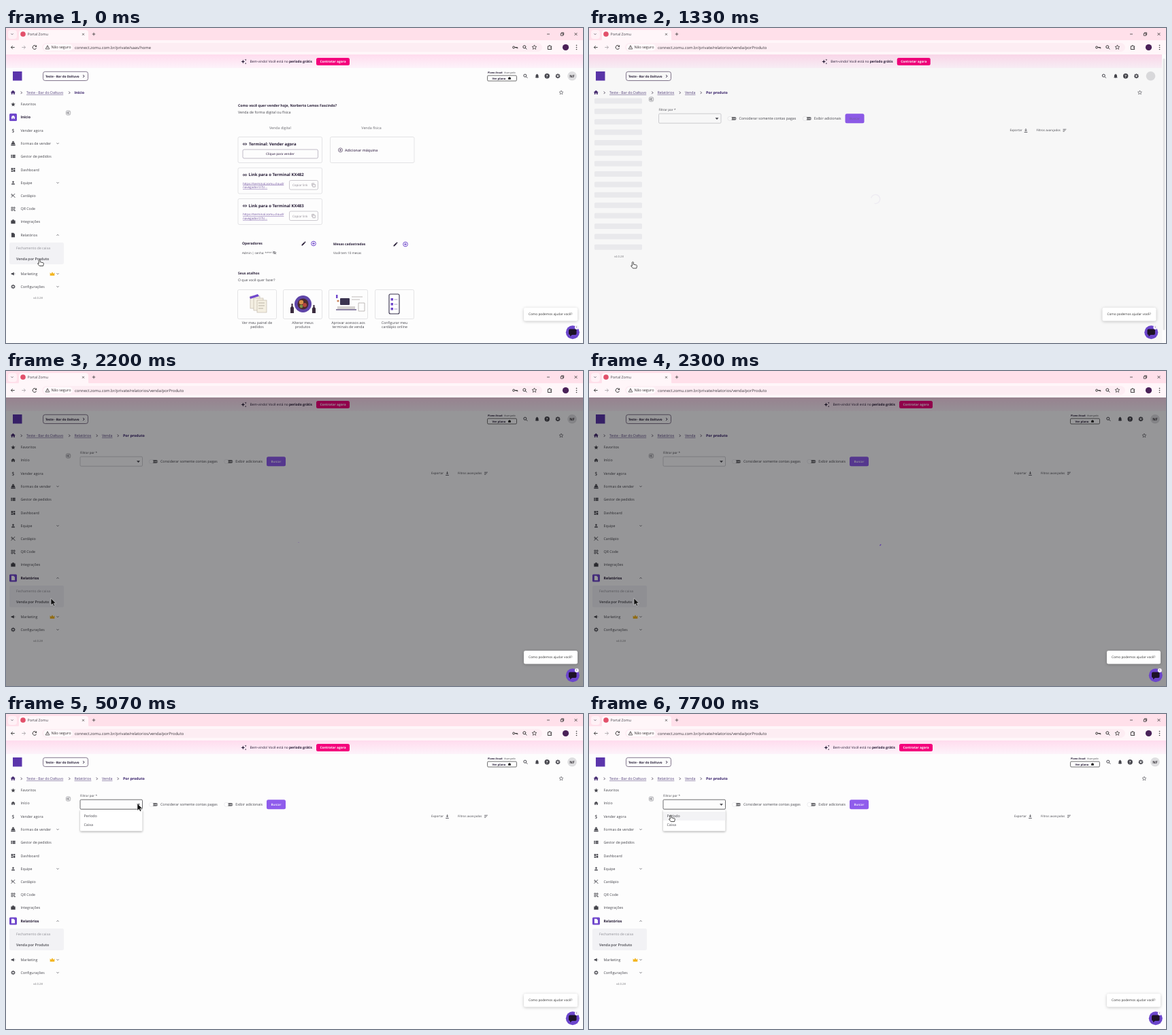
Animation, 848 px wide and 464 px high, one loop 8000 ms. Source, as an HTML page:

```html
<!DOCTYPE html>
<html lang="pt-BR">
<head>
<meta charset="utf-8">
<title>Portal Zomu</title>
<style>
html, body { margin: 0; width: 100%; height: 100%; overflow: hidden; background: #fdfdfd; }
svg { display: block; width: 100vw; height: 100vh; font-family: "Open Sans", "Noto Sans", sans-serif; text-rendering: geometricPrecision; }
</style>
</head>
<body>
<svg id="stage" viewBox="0 0 848 464"></svg>
<script>
const LOOP = 8000, BG = '#fdfdfd', INK = '#45454c', DARK = '#261c36', PURPLE = '#7048cc', LINE = '#d8d8dc';
const stage = document.getElementById('stage');

function el(parent, tag, attrs = {}) {
  const node = document.createElementNS('http://www.w3.org/2000/svg', tag);
  for (const k in attrs) node.setAttribute(k, attrs[k]);
  parent.appendChild(node);
  return node;
}
const group = (parent, attrs) => el(parent, 'g', attrs);
const rect = (p, x, y, width, height, fill, more = {}) => el(p, 'rect', { x, y, width, height, fill, ...more });
const disc = (p, cx, cy, r, fill, more = {}) => el(p, 'circle', { cx, cy, r, fill, ...more });
const path = (p, d, fill, more = {}) => el(p, 'path', { d, fill, ...more });
const stroked = (p, d, stroke, width = 0.8) => path(p, d, 'none', { stroke, 'stroke-width': width });
const box = (p, x, y, w, h, stroke = LINE, fill = 'none', rx = 2) => rect(p, x, y, w, h, fill, { rx, stroke, 'stroke-width': 0.7 });

// y is the middle of the line
function text(p, x, y, str, size = 5.3, fill = INK, more = {}) {
  const node = el(p, 'text', { x, y: y + size * 0.36, 'font-size': size, fill, ...more });
  node.textContent = str;
  return node;
}
const BOLD = { 'font-weight': 700 }, SEMI = { 'font-weight': 600 }, MID = { 'text-anchor': 'middle' };
const LINK = { 'text-decoration': 'underline' };

// Icons live on a 24 unit grid
const ICON = {
  star: 'M12 17.3l6.2 3.7-1.6-7L22 9.2l-7.2-.6L12 2 9.2 8.6 2 9.2l5.5 4.8-1.7 7z',
  home: 'M10 20v-6h4v6h5v-8h3L12 3 2 12h3v8z',
  till: 'M8 2h8v5H8zM6 8h12l4 9H2zM2 18h20v4H2z',
  list: 'M2 5h5v4H2zM9 5h13v4H9zM2 10h5v4H2zM9 10h13v4H9zM2 15h5v4H2zM9 15h13v4H9z',
  board: 'M3 13h8V3H3zm0 8h8v-6H3zm10 0h8V11h-8zm0-18v6h8V3z',
  person: 'M12 12a4 4 0 100-8 4 4 0 000 8zm-8 8h16v-2c0-3-5-4-8-4s-8 1-8 4z',
  fork: 'M4 3l17 18M20 3L3 20M3 8l6 4',
  squares: 'M4 4h6v6H4zM14 4h6v6h-6zM4 14h6v6H4zM14 14h3v3h-3zM18 18h3v3h-3z',
  bag: 'M2 6h20v15H2zM8 2h8v4H8z',
  doc: 'M4 2h10l6 6v14H4z',
  horn: 'M3 10v5h4l9 5V5L7 10zM18 11h4v2h-4z',
  gear: 'M12 6.5a5.5 5.5 0 110 11 5.5 5.5 0 010-11M12 2v4M12 18v4M2 12h4M18 12h4M5 5l3 3M16 16l3 3M19 5l-3 3M8 16l-3 3',
  bell: 'M10 20h4l-2 2zm8-4v-5c0-3-1.6-5.6-4.5-6.3V3h-3v1.7C7.6 5.4 6 8 6 11v5l-2 2v1h16v-1z',
  search: 'M10 4a6 6 0 110 12 6 6 0 010-12M14.5 14.5l6 6',
  right: 'M9 5l7 7-7 7', down: 'M6 9l6 6 6-6', up: 'M6 15l6-6 6 6',
  pencil: 'M3 17v4h4L18 10l-4-4zM20.7 7V5.5L18.5 3H17l-2 2 4 4z',
  add: 'M12 3a9 9 0 110 18 9 9 0 010-18M12 7v10M7 12h10',
  link: 'M10 8H7a4 4 0 000 8h3M14 8h3a4 4 0 010 8h-3M8 12h8',
  copy: 'M8 8h12v13H8zM4 16V3h12',
  save: 'M12 3v11M7 10l5 5 5-5M4 21h16',
  lines: 'M3 6h18M3 12h14M3 18h8',
  spark: 'M9 4l2 6 6 2-6 2-2 6-2-6-6-2 6-2zM19 1l1 3 3 1-3 1-1 3-1-3-3-1 3-1zM19 16l1 2 2 1-2 1-1 2-1-2-2-1 2-1z',
  back: 'M21 12H4M11 4l-8 8 8 8', forth: 'M3 12h17M13 4l8 8-8 8',
  reload: 'M19 7a8.5 8.5 0 101 8M20 3v6h-6',
  cross: 'M5 5l14 14M19 5L5 19', plus: 'M12 3v18M3 12h18', minus: 'M4 12h16',
  restore: 'M4 8h12v12H4zM8 8V4h12v12h-4',
  warn: 'M12 3L2 21h20zM12 9v6M12 17v2',
  key: 'M7 8a4 4 0 110 8 4 4 0 010-8M11 12h11v5M17 12v4',
  puzzle: 'M4 7h5V4h5v3h6v5h-3v4h3v5H4z',
  crown: 'M2 20V7l5 5 5-8 5 8 5-5v13z',
  eye: 'M2 12c5-8 15-8 20 0-5 8-15 8-20 0M12 9v6M3 3l18 18'
};
function icon(p, name, x, y, size = 8, color = INK, width = 0) {
  const k = size / 24;
  return path(p, ICON[name], width ? 'none' : color, {
    transform: `translate(${x - size / 2} ${y - size / 2}) scale(${k})`,
    stroke: width ? color : 'none', 'stroke-width': width
  });
}

function drawBrowser(p) {
  rect(p, 0, 0, 848, 19, '#ffe0ea');
  rect(p, 3, 3, 13, 13, '#fff1f6', { rx: 4 });
  icon(p, 'down', 9, 9, 6, INK, 3);
  path(p, 'M16 19q3 0 3-3V7q0-4 4-4h94q4 0 4 4v9q0 3 3 3z', '#fff6f9');
  rect(p, 0, 18, 848, 21, '#fff6f9');
  disc(p, 25, 9, 3.8, '#e2506a');
  text(p, 31.5, 9.3, 'Portal Zomu');
  icon(p, 'cross', 113.5, 9.3, 5, '#222', 3);
  icon(p, 'plus', 129, 9, 6, '#333', 3);
  icon(p, 'minus', 797, 9, 6, '#333', 3);
  icon(p, 'restore', 817.5, 9, 6.5, '#333', 3);
  icon(p, 'cross', 837.5, 9, 6.5, '#333', 3);
  icon(p, 'back', 10, 28.5, 7, '#333', 3);
  icon(p, 'forth', 26, 28.5, 7, '#aaa4a8', 3);
  icon(p, 'reload', 42, 28.5, 8, '#333', 3);
  rect(p, 53, 22, 735, 13, '#fdedf3', { rx: 6.5 });
  rect(p, 55, 23.5, 43, 10, '#fff9fb', { rx: 5 });
  icon(p, 'warn', 61, 28.3, 7, '#333', 2.4);
  text(p, 66.5, 28.5, 'Não seguro', 5.4, '#333');
  icon(p, 'key', 748, 28.5, 9, '#333', 2.6);
  icon(p, 'search', 762.5, 28.5, 8, '#333', 3);
  icon(p, 'star', 776.5, 28.3, 8, '#333', 2.2);
  icon(p, 'puzzle', 799, 28.5, 8, '#333', 2.8);
  disc(p, 822.5, 28.5, 4.6, '#4a2158');
  for (const y of [25.5, 28.5, 31.5]) disc(p, 838.5, y, 0.8, '#333');
  return text(p, 101, 28.5, '', 5.82, '#38343a');
}

function drawSidebar(p) {
  rect(p, 5, 316, 80, 32, '#f2f2f5', { rx: 2 });
  const rows = [
    ['star', 'Favoritos', 112.5], ['home', 'Início', 131.5], ['', 'Vender agora', 151], ['till', 'Formas de vender', 170, 'down'],
    ['list', 'Gestor de pedidos', 189], ['board', 'Dashboard', 209], ['person', 'Equipe', 228, 'down'], ['fork', 'Cardápio', 247],
    ['squares', 'QR Code', 266.5], ['bag', 'Integrações', 285.5], ['doc', 'Relatórios', 305, 'up'],
    ['horn', 'Marketing', 362, 'down'], ['gear', 'Configurações', 381, 'down']
  ];
  const items = {};
  for (const [name, label, y, arrow] of rows) {
    const tile = rect(p, 5, y - 5.5, 11, 11, PURPLE, { rx: 1.5 });
    const mark = name ? icon(p, name, 10.5, y, 7.6, INK, { fork: 3, squares: 2.4, gear: 3.5 }[name] || 0)
      : text(p, 10.5, y, '$', 7.5, INK, MID);
    const title = text(p, 21.5, y, label);
    if (arrow) icon(p, arrow, 76, y, 6, INK, 3);
    items[label] = on => {
      tile.setAttribute('opacity', on ? 1 : 0);
      if (name && mark.getAttribute('fill') !== 'none') mark.setAttribute('fill', on ? '#fff' : INK);
      title.setAttribute('font-weight', on ? 700 : 400);
      title.setAttribute('fill', on ? DARK : INK);
    };
    items[label](false);
  }
  icon(p, 'crown', 68, 362, 8, '#f3b41c');
  text(p, 15, 324, 'Fechamento de caixa', 5.1, '#8f8f96');
  text(p, 15, 340, 'Venda por Produto', 5.3, INK, SEMI);
  text(p, 40, 397, 'v4.0.28', 4.2, '#77777c');
  return items;
}

function drawSkeleton(p) {
  for (let i = 0; i < 15; i++) rect(p, 8, 103.5 + i * 15.37, 70, 8, '#efeff2', { rx: 1.5 });
  text(p, 37, 336, 'v4.0.28', 4.2, '#77777c');
}

function drawHeaderRight(p) {
  const plan = group(p);
  text(plan, 708, 66, 'Plano Atual:', 3.7, DARK, BOLD);
  text(plan, 732, 66, 'Avançado', 3.7);
  box(plan, 707.5, 70, 43, 8, '#333', '#fff', 1.5);
  text(plan, 714.5, 74, 'Ver plano', 4.2, DARK, BOLD);
  icon(plan, 'bag', 740, 74, 4.5, '#222');
  icon(p, 'search', 763.5, 70.8, 8, INK, 3);
  icon(p, 'bell', 780.5, 70.8, 8);
  disc(p, 795.2, 70.8, 3.7, INK);
  text(p, 795.2, 70.9, '?', 5.6, BG, { ...MID, ...BOLD });
  icon(p, 'gear', 811, 70.8, 8.5, INK, 3.8);
  disc(p, 832, 70.8, 6.8, '#dedee0');
  const initials = text(p, 832, 70.9, 'NF', 5.4, '#38343a', { ...MID, ...BOLD });
  icon(p, 'star', 816, 95, 7, INK, 2);
  return [plan, initials];
}

function crumbs(p, list) {
  const last = list.length - 1;
  list.forEach(([x, label, arrow], i) => {
    icon(p, 'right', arrow, 95.3, 6, DARK, 3);
    text(p, x, 95, label, 5.3, i < last ? '#54407c' : '#37206a', i < last ? LINK : BOLD);
  });
}

function drawHome(p) {
  crumbs(p, [[30, 'Teste - Bar do Daltuvo', 22.5], [100.5, 'Início', 93]]);
  text(p, 341, 114, 'Como você quer vender hoje, Norberto Lemos Fascindo?', 5.2, DARK, BOLD);
  text(p, 341, 124.3, 'Venda de forma digital ou física');
  text(p, 403, 147.3, 'Venda digital', 5.3, '#6a6a70', MID);
  text(p, 537, 147.3, 'Venda física', 5.3, '#6a6a70', MID);
  box(p, 341, 160.5, 123.5, 38);
  icon(p, 'link', 351, 171, 7, DARK, 3);
  text(p, 357, 170.8, 'Terminal: Vender agora', 6, DARK, BOLD);
  box(p, 348, 179, 110.5, 13, '#a69fb0');
  text(p, 403, 185.6, 'Clique para vender', 4.6, '#51405f', { ...MID, ...SEMI });
  box(p, 476.5, 160.5, 123.5, 38);
  icon(p, 'add', 491.5, 179.8, 8, '#51405f', 2.2);
  text(p, 498, 179.8, 'Adicionar máquina', 5.3, '#51405f', SEMI);
  ['KX482', 'KX483'].forEach((code, i) => {
    const y = 206 + i * 45.5;
    box(p, 341, y, 123.5, 38);
    icon(p, 'link', 351, y + 10.5, 7, DARK, 3);
    text(p, 356.5, y + 10.3, 'Link para o Terminal ' + code, 6, DARK, BOLD);
    text(p, 348, y + 23, 'https://terminal.zomu.cloud/', 4.5, '#6b4a9c', LINK);
    text(p, 348, y + 28.8, 'navegador/27(c...', 4.5, '#6b4a9c', LINK);
    box(p, 416.5, y + 18.5, 42, 13.5, '#b6b2ba');
    text(p, 421, y + 25.5, 'Copiar link', 4.5, '#8d8791');
    icon(p, 'copy', 452, y + 25.5, 7, '#8d8791', 2);
  });
  text(p, 347, 317.5, 'Operadores', 5.1, DARK, BOLD);
  icon(p, 'pencil', 437.5, 317.5, 8, DARK);
  icon(p, 'add', 452, 317.5, 9, PURPLE, 2.6);
  text(p, 347, 331, 'Admin | senha: ****', 4.5);
  icon(p, 'eye', 394.5, 331, 6, INK, 2.6);
  text(p, 481, 318, 'Mesas cadastradas', 5, DARK, BOLD);
  icon(p, 'pencil', 572.5, 318.5, 8, DARK);
  icon(p, 'add', 587, 318.5, 9, PURPLE, 2.6);
  text(p, 481, 331, 'Você tem 10 mesas', 4.6);
  text(p, 341, 361.5, 'Seus atalhos', 5, DARK, BOLD);
  text(p, 341, 371, 'O que você quer fazer?', 5.1);
  const tiles = [[369, 'Ver meu painel de', 'pedidos'], [436, 'Alterar meus', 'produtos'],
    [503, 'Aprovar acessos aos', 'terminais de venda'], [571, 'Configurar meu', 'cardápio online']];
  for (const [x, a, b] of tiles) {
    box(p, x - 28.5, 385.5, 57, 43);
    text(p, x, 434, a, 5.25, INK, MID);
    text(p, x, 440, b, 5.25, INK, MID);
  }
  for (let i = 0; i < 3; i++) rect(p, 359 + i * 5, 395 + i * 3, 14, 18, '#f4efe2', { stroke: '#b9b0a0', 'stroke-width': 0.6 });
  path(p, 'M358 396l12-4 2 3-13 4z', PURPLE);
  stroked(p, 'M371 405h9M371 409h9M371 413h7', '#a39a8c', 0.7);
  disc(p, 436.5, 406.5, 12.5, '#5f45a8');
  disc(p, 436.5, 406.5, 8, '#4b2a2e');
  disc(p, 434, 404, 3.2, '#d8924a');
  disc(p, 439, 408, 3, '#b5473c');
  disc(p, 434, 410, 2.4, '#7d9448');
  path(p, 'M418 420v-8l1.5-2v-4h2v4l1.5 2v8zM450 420v-7l1.5-2v-3h2v3l1.5 2v7z', '#3a2b3e');
  rect(p, 491, 398, 14, 10, '#3b3450', { rx: 1 });
  rect(p, 487, 410, 26, 4, '#d6d2d0');
  rect(p, 485, 414, 30, 2, '#8f86a8');
  rect(p, 485, 393, 2.5, 5, PURPLE);
  stroked(p, 'M508 396h16M508 400h12M518 405v12h9v-12z', '#b8b3b0', 0.9);
  disc(p, 488, 402, 1.6, '#c9825a');
  rect(p, 563, 392, 15, 29, '#fff', { rx: 2, stroke: '#37314d', 'stroke-width': 1.1 });
  for (const y of [398, 405, 412]) {
    rect(p, 565.5, y, 3.5, 3.5, PURPLE);
    stroked(p, `M570.5 ${y + 2}h5`, '#a49cc4', 0.9);
  }
}

function toggle(p, x, label) {
  rect(p, x - 4, 131, 10, 4.8, '#6c6c70', { rx: 2.4 });
  disc(p, x - 3.5, 133.4, 3.1, '#fff', { stroke: LINE, 'stroke-width': 0.5 });
  stroked(p, `M${x + 1} 133.4h5`, BG, 0.6);
  text(p, x + 10, 133.4, label);
}

function drawReport(p) {
  text(p, 109, 120, 'Filtrar por *', 4.6, INK);
  const field = box(p, 109, 126.2, 91.5, 14, '#bdbdc2', 'none', 1.5);
  path(p, 'M192 132.3h5l-2.5 2.6z', INK);
  toggle(p, 217, 'Considerar somente contas pagas');
  toggle(p, 327.3, 'Exibir adicionais');
  const button = rect(p, 383, 126.2, 28, 14, '#8f5cec', { rx: 2.5 });
  const label = text(p, 397, 133.4, 'Buscar', 4.5, '#fff', { ...MID, ...SEMI });
  text(p, 625, 150.8, 'Exportar', 4.5);
  icon(p, 'save', 648.5, 150.8, 7, INK, 3);
  text(p, 664, 150.8, 'Filtros avançados', 4.4);
  icon(p, 'lines', 705.5, 150.8, 6.5, INK, 2.4);
  return { field, button, label };
}

// Scene, back to front
rect(stage, 0, 0, 848, 464, BG);
const pink = el(stage, 'linearGradient', { id: 'pink', x2: 0, y2: 1 });
el(pink, 'stop', { offset: 0, 'stop-color': '#ffdcee' });
el(pink, 'stop', { offset: 1, 'stop-color': '#fdf3fa' });
rect(stage, 0, 39, 848, 20, 'url(#pink)');
const banner = group(stage);
icon(banner, 'spark', 349.5, 49.5, 9, DARK);
const hello = text(banner, 358.5, 49.3, 'Bem-vindo! Você está no ', 4.9, DARK);
const tail = el(hello, 'tspan', BOLD);
tail.textContent = 'período grátis';
rect(banner, 456, 44, 49, 11, '#f4007c', { rx: 2.5 });
text(banner, 480.5, 49.4, 'Contratar agora', 4.8, '#fff', { ...MID, ...BOLD });

rect(stage, 10, 64, 13.5, 13.5, '#5b35ab');
box(stage, 54.5, 64.3, 66, 13.2, '#51405f', 'none', 3);
text(stage, 58, 71, 'Teste - Bar do Daltuvo', 4.55, DARK, BOLD);
icon(stage, 'right', 114, 71, 6.5, DARK, 3.4);
icon(stage, 'home', 10.3, 95, 8.5, '#43286f');

const right = group(stage);
const [plan, initials] = drawHeaderRight(right);
const reportCrumbs = group(stage);
crumbs(reportCrumbs, [[30, 'Teste - Bar do Daltuvo', 22.5], [100.5, 'Relatórios', 93], [141, 'Venda', 133.5], [172, 'Por produto', 164.5]]);
const home = group(stage);
drawHome(home);
const sidebar = group(stage), items = drawSidebar(sidebar);
const skeleton = group(stage);
drawSkeleton(skeleton);
const fold = group(stage);
rect(fold, -3.2, -3.2, 6.4, 6.4, '#f1f1f3', { rx: 2, stroke: '#8c8c90', 'stroke-width': 0.6 });
stroked(fold, 'M1.5-1.8L-.3 0l1.8 1.8M-.3-1.8L-2 0l1.7 1.8', INK, 0.7);
const report = group(stage), form = drawReport(report);

const menu = group(stage, { style: 'filter:drop-shadow(0 1.5px 1.5px rgba(0,0,0,.35))' });
rect(menu, 109, 141, 91.5, 31.5, '#fff', { rx: 1.5 });
const hover = rect(menu, 109, 144, 91.5, 12.8, '#f3f3f5');
text(menu, 114.5, 150.3, 'Período');
text(menu, 114.5, 163.2, 'Caixa');

const veil = rect(stage, 0, 39, 848, 425, '#979799', { style: 'mix-blend-mode:multiply' });
const spinner = disc(stage, 0, 0, 6.6, 'none', { stroke: '#5f3aa6', 'stroke-width': 1.4, pathLength: 126.9 });
const scrollbar = group(stage);
rect(scrollbar, 842, 39, 6, 425, '#fcfcfc');
rect(scrollbar, 843.5, 45, 3, 400, '#e2e2e4', { rx: 1.5 });

const chat = group(stage);
rect(chat, 761, 412, 79, 19.5, '#fff', { rx: 2.5, style: 'filter:drop-shadow(0 1px 2px rgba(0,0,0,.22))' });
text(chat, 768, 421.7, 'Como podemos ajudar você?', 4.75, '#333');
disc(chat, 832.8, 448.3, 10, '#6c46cc');
rect(chat, 827, 443.5, 11.5, 8.5, '#1c1226', { rx: 2 });
path(chat, 'M829 451v3.5l4-3.5z', '#1c1226');
disc(chat, 838.8, 441, 3, '#f4f0fa');
text(chat, 838.8, 441, '1', 3.6, '#333', MID);

const address = drawBrowser(stage);

const arrow = path(stage, 'M0 0v10.2l2.4-2.2 1.7 3.6 1.7-.8-1.6-3.5h3.3z', '#111', { stroke: '#fff', 'stroke-width': 0.5 });
const hand = path(stage, 'M-.8.6q1-1.4 2 0v3.2l4.2.9q1 .3.9 1.4l-.7 3.4H.3L-2.6 6q.3-1.2 1.8 0z', '#fff', { stroke: '#222', 'stroke-width': 0.8, 'stroke-linejoin': 'round' });

// Time, x, y of the pointer tip
const TRACK = [[0, 49, 341], [400, 49, 341], [1250, 64, 344], [1430, 64.5, 345], [2000, 66, 335], [2550, 66, 334.5],
  [3000, 115, 352], [3070, 115, 352], [3370, 129, 305], [4150, 193, 132], [5450, 193, 132], [6250, 166, 158], [6800, 120, 149], [LOOP, 120, 149]];

const clamp = v => Math.max(0, Math.min(1, v));
const ramp = (t, a, b) => clamp((t - a) / (b - a));
const smooth = p => p * p * (3 - 2 * p);
const show = (node, on) => node.setAttribute('visibility', on ? 'visible' : 'hidden');
const move = (node, x, y = 0) => node.setAttribute('transform', `translate(${x} ${y})`);

function pointer(t) {
  const i = TRACK.findIndex(k => k[0] > t), [t0, x0, y0] = TRACK[i - 1], [t1, x1, y1] = TRACK[i];
  const p = smooth(ramp(t, t0, t1));
  return [x0 + (x1 - x0) * p, y0 + (y1 - y0) * p];
}

function spin(age, x) {
  const p = (age / 1400) % 1;
  const grow = smooth(clamp(p * 2)), slide = smooth(clamp(p * 2 - 1));
  spinner.setAttribute('stroke-dasharray', `${1 + 99 * grow} 200`);
  spinner.setAttribute('stroke-dashoffset', -15 * grow - 110 * slide);
  spinner.setAttribute('transform', `translate(${x} 252) rotate(${p * 360})`);
}

function draw(t) {
  const atHome = t < 1000, loading = !atHome && t < 1900, shift = loading ? -6.5 : 0;
  address.textContent = 'connect.zomu.com.br/private/' + (atHome ? 'saas/home' : 'relatorios/venda/porProduto');
  show(home, atHome);
  show(reportCrumbs, !atHome);
  show(report, !atHome);
  show(sidebar, !loading);
  show(skeleton, loading);
  show(scrollbar, loading);
  show(plan, !loading);
  show(initials, !loading);
  items['Início'](atHome);
  items['Relatórios'](!atHome);
  move(banner, shift / 2);
  for (const node of [right, report, chat]) move(node, shift);
  move(fold, 91.5, loading ? 105 + 17 * ramp(t, 1335, 1425) : 125);

  const busy = t > 1380 && t < 1900;
  form.button.setAttribute('fill', busy ? '#d2c8e8' : '#8f5cec');
  form.label.setAttribute('fill', loading ? '#7a62a8' : '#fff');

  const dim = ramp(t, 1326, 1410) * (1 - ramp(t, 2800, 2950));
  veil.setAttribute('opacity', dim);
  spinner.setAttribute('opacity', t < 1900 || t >= 2190 ? dim : 0);
  if (t < 1900) spin(t + 670, 421); else spin(Math.max(0, t - 2190), 423.4);

  const open = smooth(ramp(t, 4450, 4620));
  menu.setAttribute('opacity', open);
  menu.setAttribute('transform', `translate(0 ${141 * (1 - open) * 0.2}) scale(1 ${0.8 + 0.2 * open})`);
  form.field.setAttribute('stroke', t > 4430 ? '#2e2e33' : '#bdbdc2');

  const [x, y] = pointer(t);
  const overMenu = t > 5450 && y > 144;
  show(hover, overMenu);
  hover.setAttribute('y', y < 156.8 ? 144 : 156.8);
  const pointing = t < 1900 || overMenu;
  show(hand, pointing);
  show(arrow, !pointing);
  move(pointing ? hand : arrow, x, y);
}

function tick() {
  draw(performance.now() % LOOP);
  requestAnimationFrame(tick);
}
tick();
</script>
</body>
</html>
```
